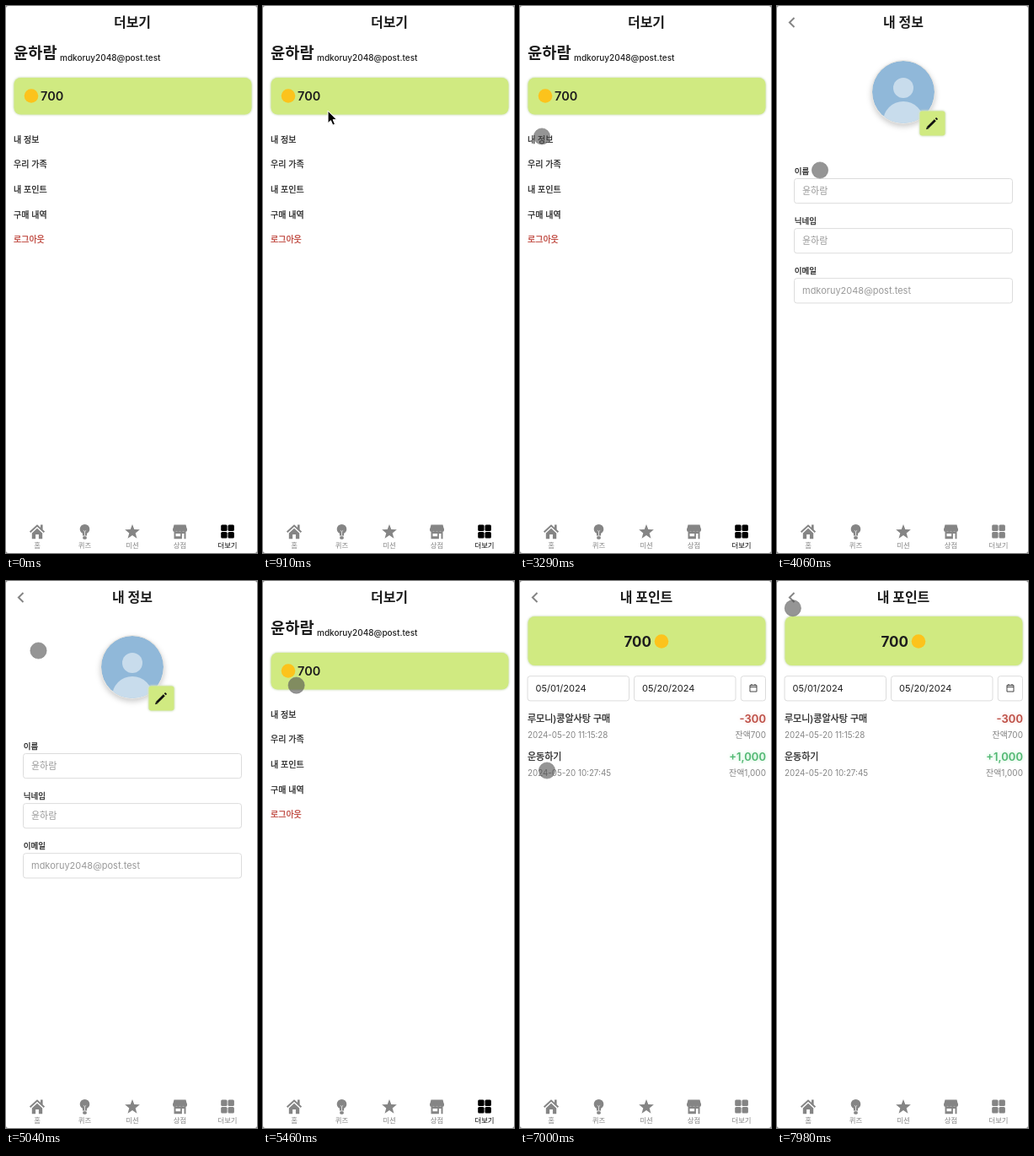
Animation, 298 px wide and 648 px high, one loop 8000 ms. Source, as an HTML page:

```html
<!DOCTYPE html>
<html lang="ko">
<head>
<meta charset="utf-8">
<style>
html, body { margin: 0; width: 100%; height: 100%; overflow: hidden; background: #8a8a8a; }
svg { display: block; }
text { font-family: Inter, "Noto Sans CJK KR", "Noto Sans CJK", "Noto Sans CJK JP", sans-serif; white-space: pre; }
.medium { stroke: currentColor; stroke-width: .25; }
.card { fill: #d0ea81; filter: drop-shadow(0 0 1px #cbdcb4) drop-shadow(0 0 1px #dfe9d2); }
.field { fill: #fff; stroke: #dcdcdc; }
.minus { filter: drop-shadow(0 0 2px #f3cfcb); }
.plus { filter: drop-shadow(0 0 2px #b4edc6); }
</style>
</head>
<body>
<svg id="stage" width="298" height="648" viewBox="0 0 298 648"></svg>
<script>
const USER = '윤하람', MAIL = 'mdkoruy2048@post.test';
const INK = '#1d1d1d', RED = '#b9372d', GREY = '#858585';

// Text placed by its vertical centre line; anchor is start, middle or end
const text = (s, x, cy, size, { weight = 400, fill = INK, anchor = 'start', cls = '' } = {}) =>
  `<text x="${x}" y="${cy + size * 0.365}" font-size="${size}" font-weight="${weight}" fill="${fill}" color="${fill}"
    text-anchor="${anchor}" class="${cls}">${s}</text>`;
const medium = { cls: 'medium' };
const rect = (x, y, w, h, r = 0, attrs = '') =>
  `<rect x="${x}" y="${y}" width="${w}" height="${h}" rx="${r}" ${attrs}/>`;
const circle = (x, y, r, attrs) => `<circle cx="${x}" cy="${y}" r="${r}" ${attrs}/>`;
const title = s => text(s, 150, 19.5, 16, { weight: 700, anchor: 'middle' });
const card = (y, h) => rect(9.5, y, 282, h, 8, 'class="card"');
const coin = (x, y) => circle(x, y, 8.3, 'fill="#fcc31c"');
const field = (x, y, w) => rect(x, y, w, 29.2, 3, 'class="field"');
const back = '<path d="M20.5 14l-5.6 5.5l5.6 5.5" fill="none" stroke="#858585" stroke-width="2"/>';

const star = Array.from({ length: 10 }, (_, i) => {
  const r = i % 2 ? 3.9 : 9.3, a = i * Math.PI / 5;
  return `${r * Math.sin(a)},${0.7 - r * Math.cos(a)}`;
}).join(' ');
const scallops = [-6, -2, 2, 6].map(x => circle(x, -2, 2.5, '')).join('');
const squares = [0, 1, 2, 3].map(i => rect(-7.8 + i % 2 * 8.3, -8 + (i >> 1) * 8.5, 7.4, 7.6, 1.5)).join('');

// Icons are centred on the origin
const icons = {
  '홈': `<path d="M-8.4 .7L0-7L8.4 .7" fill="none" stroke="currentColor" stroke-width="2"/>
    ${rect(4, -8, 2.6, 6)}<path d="M-6.2 2L0-3.8L6.2 2V8.7H1.9V3.6H-1.9V8.7H-6.2Z"/>`,
  '퀴즈': circle(0, -2.8, 5.8, '') + rect(-2.6, 1, 5.2, 4) + rect(-2.3, 5.8, 4.6, 3.4, 1.4) +
    '<path d="M-1.6-1.2L0 .2L1.6-1.2M0 .2V4.6" fill="none" stroke="#fff" stroke-width=".7"/>',
  '미션': `<polygon points="${star}"/>`,
  '상점': `<path d="M-7-8H7L8.5-2H-8.5Z"/>${scallops}
    <path fill-rule="evenodd" d="M-7 0H7V8.7H-7ZM-5 2.6V5.8H.6V2.6ZM2.4 2.6V8.7H5V2.6Z"/>`,
  '더보기': squares
};

const tabs = active => Object.entries(icons).map(([name, art], i) => {
  const x = 37 + i * 56.5, on = name === active, color = on ? '#000' : GREY;
  return `<g transform="translate(${x} 622.5)" fill="currentColor" color="${color}">${art}</g>` +
    text(name, x, 639, 8.4, { fill: color, anchor: 'middle' });
}).join('');

const menuPage = () => title('더보기') +
  text(USER, 9, 55.5, 18.7, { weight: 600 }) + text(MAIL, 64, 61, 10, { weight: 500 }) +
  card(85, 43.5) + coin(30, 106.5) + text('700', 41, 106.5, 14.5, { weight: 600 }) +
  ['내 정보', '우리 가족', '내 포인트', '구매 내역', '로그아웃'].map((s, i) =>
    text(s, 9, 158 + i * 29.7, 10, { ...medium, fill: i < 4 ? INK : RED })).join('') +
  tabs('더보기');

const infoPage = () => back + title('내 정보') +
  '<clipPath id="face"><circle cx="150" cy="102" r="37"/></clipPath>' +
  circle(150, 102, 38, 'fill="#e9e7e3" style="filter:drop-shadow(0 3px 3px #ccc)"') +
  `<g clip-path="url(#face)" fill="#c8dcec">
    ${circle(150, 102, 37, 'fill="#90b8d9"')}${circle(150, 97, 12, '')}${circle(150, 137, 24, '')}
  </g>` +
  rect(169.5, 124.5, 30, 29, 3, 'class="card"') +
  `<path d="M179 144l8.8-8.8m.9-.9l1.4-1.4" stroke="#111" stroke-width="2.8"/>
  <path d="M177 146.3l1-3.3l2.2 2.2Z" fill="#111"/>` +
  [['이름', USER], ['닉네임', USER], ['이메일', MAIL]].map(([label, value], i) => {
    const y = 204.5 + i * 59.1;
    return text(label, 20.7, y - 9, 9.5, medium) + field(20.5, y, 259) +
      text(value, 30, y + 14.5, 11, { fill: '#999' });
  }).join('') + tabs();

const entry = (y, name, time, amount, balance, fill, cls) => text(name, 9, y, 11, medium) +
  text(time, 9, y + 19, 9.8, { fill: GREY }) +
  text(amount, 292, y, 13, { weight: 600, fill, cls, anchor: 'end' }) +
  text('잔액' + balance, 292, y + 19, 10, { fill: GREY, anchor: 'end' });

const pointsPage = () => back + title('내 포인트') +
  card(42, 58) + text('700', 123.5, 71.5, 17, { weight: 700 }) + coin(168, 71.5) +
  ['05/01/2024', '05/20/2024'].map((date, i) =>
    field(9 + i * 126.5, 112.7, 120.5) + text(date, 18.5 + i * 126.5, 127.3, 11)).join('') +
  field(262.3, 112.7, 29.2) +
  '<path d="M273 123.5h8v7.5h-8Zm0 2h8m-6-3.5v2m4-2v2" fill="none" stroke="#333" stroke-width=".9"/>' +
  entry(163, '루모니)콩알사탕 구매', '2024-05-20 11:15:28', '-300', '700', '#bd4d44', 'minus') +
  entry(208, '운동하기', '2024-05-20 10:27:45', '+1,000', '1,000', '#52b873', 'plus') + tabs();

const stage = document.getElementById('stage');
stage.innerHTML = rect(0, 0, 298, 648, 3, 'fill="#fff"') +
  [menuPage, infoPage, pointsPage].map(p => `<g class="page">${p()}</g>`).join('') +
  `<g id="pointer">
    <path id="arrow" d="M0 0V14.6L3.4 11.5L5.8 17L8.4 15.9L6 10.5H10.4Z" stroke="#fff"/>
    ${circle(0, 0, 9.6, 'id="touch" fill="#484848" fill-opacity=".58" stroke="#777" stroke-opacity=".7" stroke-width=".8"')}
    ${circle(0, 0, 21.7, 'id="ring" fill="none" stroke="#333" stroke-width="2"')}
  </g>`;

const [arrow, touch, ring, pointer] = ['arrow', 'touch', 'ring', 'pointer'].map(id => document.getElementById(id));
const pages = stage.querySelectorAll('.page');

const LOOP = 8000, STEP = 70, PRESS = 140;
// The first tap only focuses the window; the others open a page after a short wait
const taps = [
  { at: 2310 },
  { at: 3150, opens: 3500, page: 1 },
  { at: 4760, opens: 5180, page: 0 },
  { at: 6510, opens: 7000, page: 2 }
];
// Resting points of the pointer: time, x, y
const stops = [
  [0, 150, -30], [840, 83, 120], [1190, 26, 160], [1470, 46, 189], [1890, 39, 188.5], [2310, 22.5, 159.5],
  [2800, 71, 209], [3080, 26, 154.5], [3640, 26, 154.5], [4060, 51, 194.5], [4550, 20, 19], [4830, 20, 19],
  [5040, 38.5, 82.5], [5670, 40, 138], [6090, 38.5, 236], [6440, 32, 224.5], [7070, 32, 224.5],
  [7700, 26, 44], [LOOP, 18.7, 32]
];

function pointerAt(t) {
  const i = stops.findIndex(s => s[0] > t);
  const [t0, x0, y0] = stops[i - 1], [t1, x1, y1] = stops[i];
  const k = (t - t0) / (t1 - t0), ease = k * k * (3 - 2 * k);
  return [x0 + (x1 - x0) * ease, y0 + (y1 - y0) * ease];
}

const show = (el, on) => el.setAttribute('visibility', on ? 'visible' : 'hidden');

function draw(now) {
  const t = Math.floor((now % LOOP) / STEP + 1e-6) * STEP;
  const page = taps.reduce((current, tap) => t >= tap.opens ? tap.page : current, 0);
  pages.forEach((p, i) => show(p, i === page));
  pointer.setAttribute('transform', `translate(${pointerAt(t)})`);
  show(arrow, t < taps[0].at);
  show(touch, t >= taps[0].at);
  show(ring, taps.some(({ at }) => t >= at && t < at + PRESS));
  requestAnimationFrame(draw);
}
draw(performance.now());
</script>
</body>
</html>
```
